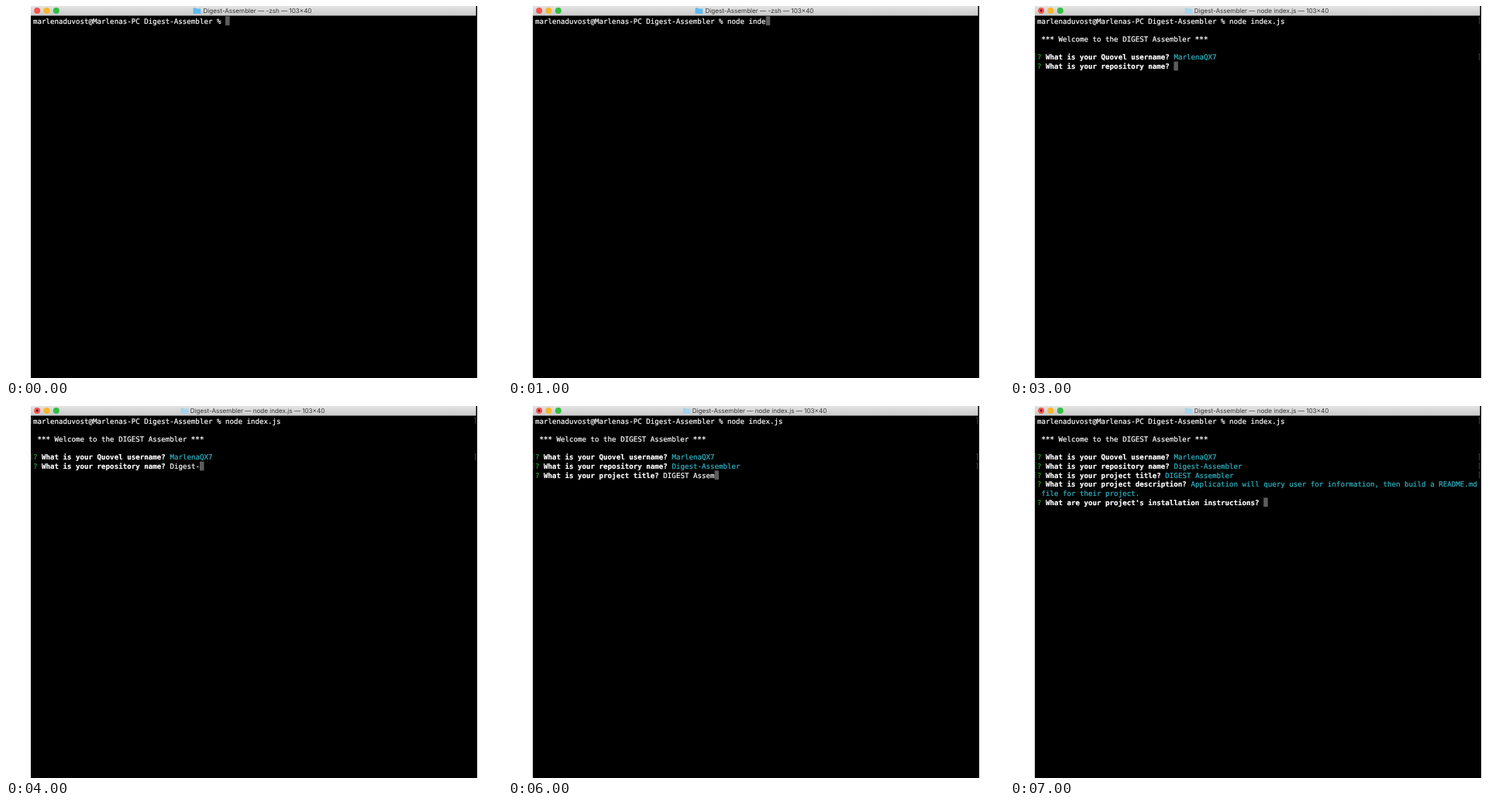
Animation of 640x480 px, one loop 8000 ms. Source, as an HTML page:

```html
<!DOCTYPE html>
<html lang="en">
<head>
<meta charset="utf-8">
<title>Terminal session</title>
<style>
  html, body { margin: 0; width: 100%; height: 100%; overflow: hidden; background: #fff; }
  svg { display: block; }
  text { white-space: pre; text-rendering: geometricPrecision; }
  #screen { font: 9.16px "DejaVu Sans Mono", monospace; }
  #screen text { fill: currentColor; stroke: currentColor; stroke-width: .2px; color: #fff; }
  #title { font: 8.1px Inter, sans-serif; fill: #363636; text-anchor: middle; }
  #screen .bold { font-weight: bold; }
  #screen .mark { color: #25a524; }
  #screen .answer { color: #2fb5c5; }
  .bracket { fill: #555; }
  .cursor { fill: #5c5c5c; }
</style>
</head>
<body>
<svg width="640" height="480" viewBox="0 0 640 480">
  <defs>
    <linearGradient id="bar" x2="0" y2="1">
      <stop stop-color="#e4e4e4"/>
      <stop offset="1" stop-color="#c9c9c9"/>
    </linearGradient>
  </defs>
  <rect x="32" width="576" height="480"/>
  <rect x="32" width="574.5" height="12.5" fill="url(#bar)"/>
  <circle cx="40.2" cy="6" r="4" fill="#f6544f"/>
  <circle cx="52.5" cy="6" r="4" fill="#f8b62c"/>
  <circle cx="64.8" cy="6" r="4" fill="#30bf42"/>
  <circle id="edited" cx="40.2" cy="6" r="1.4" fill="#6b0d0a"/>
  <path id="folder" d="M0 2.6h3.4l1 1H9.6V10H0z"/>
  <text id="title" x="324.5" y="9.1"></text>
  <g id="screen"></g>
</svg>
<script>
const STEP = 1000, LOOP = 8000;
const LEFT = 34.9, TOP = 13.3, COL = 5.515, ROW = 11.67;
const $ = id => document.getElementById(id);

const prompt = "marlenaduvost@Marlenas-PC Digest-Assembler % ";
const command = "node index.js";
const entries = [
  ["What is your Quovel username?", "MarlenaQX7"],
  ["What is your repository name?", "Digest-Assembler"],
  ["What is your project title?", "DIGEST Assembler"],
  ["What is your project description?",
    "Application will query user for information, then build a README.md", "file for their project."],
  ["What are your project's installation instructions?", ""]
];

// Per second: index of the open question (-1 = shell) and characters typed so far
const steps = [[-1, 0], [-1, 9], [0, 1], [1, 0], [1, 7], [2, 0], [2, 12], [4, 0]];

const put = (text, row, col = 0, cls = "") =>
  `<text class="${cls}" x="${LEFT + col * COL}" y="${TOP + row * ROW + 9.2}">${text}</text>`;

const cursor = (row, col) =>
  `<rect class="cursor" x="${LEFT + col * COL}" y="${TOP + row * ROW}" width="${COL}" height="${ROW}"/>`;

const brackets = row => [32.6, 604.4].map((x, i) => {
  const y = TOP + row * ROW + 1.5, edge = x + i;
  return `<path class="bracket" d="M${x} ${y}h1.6v.7h-1.6zM${edge} ${y}h.7v8.5h-.7z"/>`;
}).join("");

function screen([open, typed]) {
  if (open < 0) return put(prompt + command.slice(0, typed), 0) + cursor(0, prompt.length + typed);

  let out = brackets(0) + put(prompt + command, 0) + put("*** Welcome to the DIGEST Assembler ***", 2, 1);
  let row = 4;
  entries.slice(0, open + 1).forEach(([question, answer, rest], i) => {
    const col = question.length + 3;
    out += put("?", row, 0, "mark") + put(question, row, 2, "bold");
    if (i === open) {
      out += put(answer.slice(0, typed), row, col) + cursor(row, col + typed);
    } else {
      out += put(answer, row, col, "answer");
      if (rest) out += put(rest, ++row, 1, "answer");
      else out += brackets(row);
    }
    row++;
  });
  return out;
}

let shown = -1;
function frame(now) {
  const index = Math.floor(now % LOOP / STEP);
  if (index !== shown) {
    shown = index;
    const running = steps[index][0] >= 0;
    $("screen").innerHTML = screen(steps[index]);
    $("title").textContent = `Digest-Assembler — ${running ? command : "-zsh"} — 103×40`;
    $("folder").setAttribute("transform", `translate(${running ? 225.6 : 241.6} 0)`);
    $("folder").setAttribute("fill", running ? "#a5d3f0" : "#5bbcf2");
    $("edited").setAttribute("visibility", running ? "visible" : "hidden");
  }
  requestAnimationFrame(frame);
}
requestAnimationFrame(frame);
</script>
</body>
</html>
```
